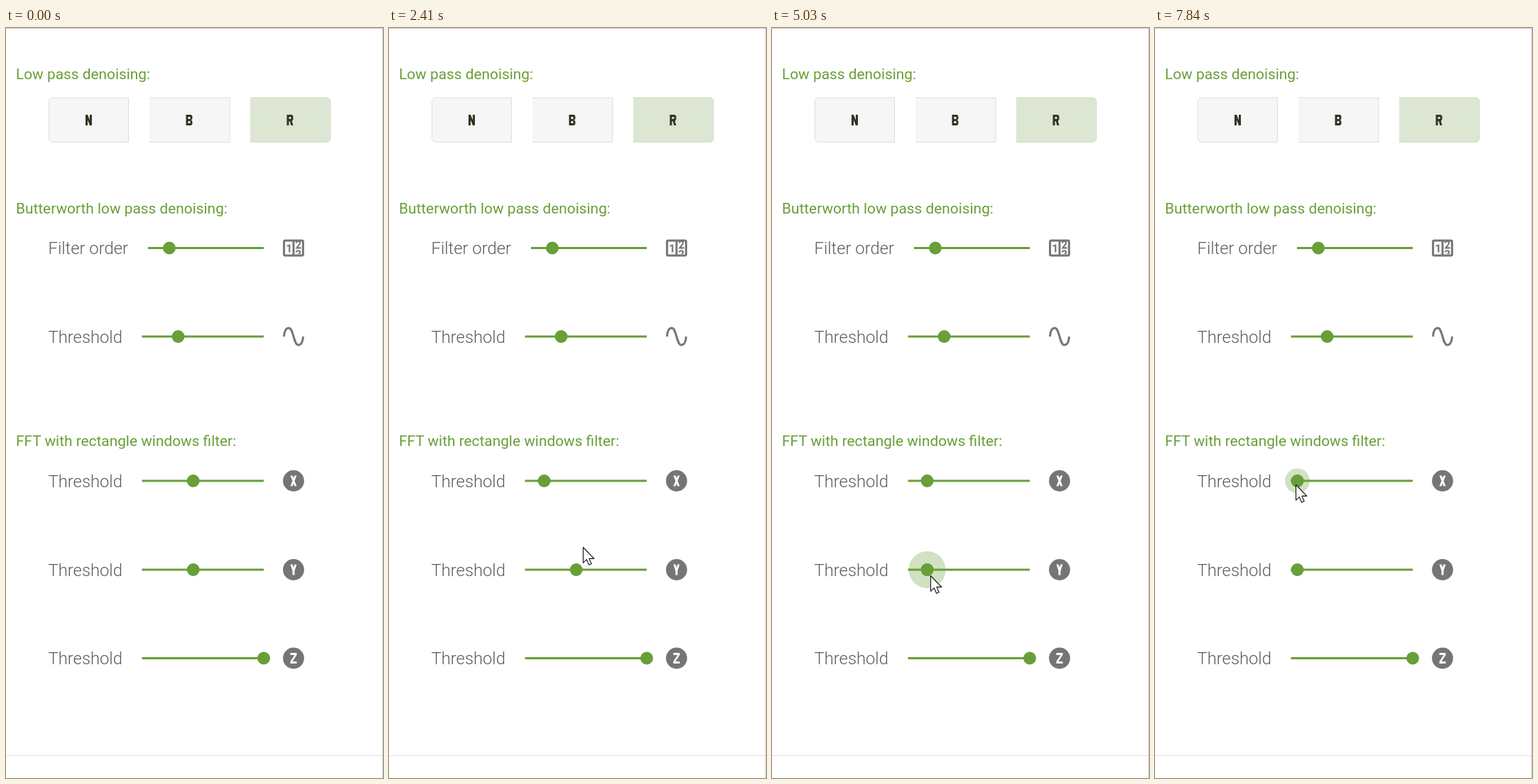
An HTML page that plays this animation: 531 by 1055 pixels, repeating every 8000 ms.

```html
<!DOCTYPE html>
<html lang="en">
<head>
<meta charset="utf-8">
<title>Denoising settings</title>
<style>
  html, body { margin: 0; width: 100%; height: 100%; overflow: hidden; background: #fff; }
  svg { display: block; width: 531px; height: 1055px; font-family: Roboto, sans-serif; }
  .head { font-size: 20.85px; fill: #689f38; }
  .label { font-size: 23.8px; font-weight: 300; fill: #5c5c5c; }
  .line { stroke: #689f38; stroke-width: 3; }
  .green { fill: #689f38; }
  .halo { fill: #689f38; fill-opacity: .3; }
  .num { font-size: 17.9px; fill: #fff; text-anchor: middle; }
  .icon { fill: #757575; }
  .stroke { fill: none; stroke: #757575; }
  .letter { fill: #2f3424; }
</style>
</head>
<body>
<svg id="stage" viewBox="0 0 531 1055">
  <path d="M0 .5H530.5V1055" fill="none" stroke="#c9c9c9"/>
  <path d="M0 1023.5H530" stroke="#e0e0e0"/>

  <g class="head">
    <text x="14" y="72">Low pass denoising:</text>
    <text x="14" y="260.5">Butterworth low pass denoising:</text>
    <text x="14" y="588">FFT with rectangle windows filter:</text>
  </g>

  <g stroke="#dedede">
    <path fill="#f6f6f6" d="M172.5 98H66a5.5 5.5 0 0 0-5.5 5.5V155a5.5 5.5 0 0 0 5.5 5.5H172.5Z"/>
    <path fill="#f6f6f6" d="M202 98H315V160.5H202"/>
    <path fill="#dde6d3" stroke="#d3dac9" d="M344 98H451.500a5.500 5.500 0 0 1 5.500 5.500V155a5.500 5.500 0 0 1-5.500 5.500H344"/>
  </g>
  <g class="letter" id="letters"></g>

  <g id="rows"></g>
  <g id="icons"></g>

  <g id="active">
    <circle class="halo" id="halo"/>
    <circle class="green" id="grip" r="9"/>
    <g id="pin">
      <path class="green" d="M0 -17L-16.400 -33.400A23.200 23.200 0 1 1 16.400 -33.400Z"/>
      <text class="num" id="num" y="-43.500"></text>
    </g>
  </g>
  <g id="cursor">
    <circle id="press" r="17.500" fill="#ff0" fill-opacity=".5"/>
    <path d="M.5 .5V22.300L5.300 17.700L8.700 25.300L12.200 23.800L8.900 16.400H15.800Z"
          fill="#fff" stroke="#111" stroke-width="1.100" stroke-linejoin="round"/>
  </g>
</svg>
<script>
const $ = id => document.getElementById(id);
const LOOP = 8000;
const ROW = { x: 637, y: 762 };
const HALO = 39;
const valueX = v => 191.5 + (v - 1) * 9.026;

// 24-unit icon shapes
const glyph = {
  N: 'M9 7H11L13 12V7H15V17H13L11 12V17H9Z',
  B: 'M15 10.5C15 11.3 14.3 12 13.5 12C14.3 12 15 12.7 15 13.5V15A2 2 0 0 1 13 17H9V7H13A2 2 0 0 1 15 9ZM13 15V13H11V15ZM13 11V9H11V11Z',
  R: 'M9 7H13A2 2 0 0 1 15 9V11C15 11.8 14.5 12.5 13.8 12.8L15 17H13L11.8 13H11V17H9ZM11 9V11H13V9Z',
  X: 'M9 7L11 12L9 17H11L12 14.5L13 17H15L13 12L15 7H13L12 9.5L11 7Z',
  Y: 'M11 17H13V13L15 7H13L12 10L11 7H9L11 13Z',
  Z: 'M9 7V9H13L9 15V17H15V15H11L15 9V7Z'
};
const icon = (x, y, body) =>
  `<g transform="translate(${x} ${y}) scale(1.489) translate(-12 -12)">${body}</g>`;
const letter = (x, y, name) =>
  icon(x, y, `<path fill-rule="evenodd" d="${glyph[name]}"/>`);
const badge = (y, name) => icon(405, y,
  `<circle class="icon" cx="12" cy="12" r="10"/><path fill="#fff" d="${glyph[name]}"/>`);
const row = (y, text, x0, knob, id = '') =>
  `<text class="label" x="59.5" y="${y + 8.5}">${text}</text>` +
  `<path class="line" d="M${x0} ${y}H363"/>` +
  `<circle class="green" ${id && `id="${id}"`} cx="${knob}" cy="${y}" r="9"/>`;

$('letters').innerHTML = letter(116.5, 129.5, 'N') + letter(258, 129.5, 'B') + letter(400, 129.5, 'R');
$('rows').innerHTML =
  row(309.5, 'Filter order', 200, 230) +
  row(434, 'Threshold', 191.5, 242.5) +
  row(ROW.x, 'Threshold', 191.5, 264, 'knobX') +
  row(ROW.y, 'Threshold', 191.5, 264, 'knobY') +
  row(886.5, 'Threshold', 191.5, 363);
$('icons').innerHTML =
  icon(405, 309.5, `<g class="stroke"><rect x="3" y="5" width="18" height="14" rx="1" stroke-width="2"/>
    <path stroke-width="2" d="M12 5V19"/>
    <path stroke-width="1.4" d="M14.65 7.3C14.7 5 18.2 5 18.15 7.3C18.1 8.5 16 10.100 15 11.9H19.2M14.7 16C14.7 14 18.2 14 18.2 16C18.2 17 17.3 17 16.8 17.6"/></g>
    <path class="icon" d="M8.92 16H7.42V10.2L5.62 10.76V9.53L8.76 8.41H8.92Z"/>`) +
  icon(405, 434, '<path class="stroke" stroke-width="2" d="M3 12C3 12 3 4 7.5 4C12 4 12 20 16.5 20C21 20 21 12 21 12"/>') +
  badge(ROW.x, 'X') + badge(ROW.y, 'Y') + badge(886.5, 'Z');

// time, pointer x, pointer y, slider, value, halo radius (HALO = dragging)
const steps = [
  [200, 351, 721], [400, 315, 690], [600, 272, 655],
  [800, 257, 651, 'x', 9, 22], [1000, 257, 651, 'x', 9, HALO],
  [1200, 248, 651, 'x', 8, HALO], [1400, 239, 651, 'x', 7, HALO],
  [1600, 225, 651, 'x', 5, HALO], [1800, 212, 651, 'x', 4, HALO],
  [2010, 214, 653, 'x', 4, 26], [2210, 242, 690], [2410, 273, 730],
  [2600, 272, 768, 'y', 9, 22], [2800, 264, 771, 'y', 8, HALO],
  [3010, 246, 771, 'y', 6, HALO], [3210, 228, 771, 'y', 4, HALO],
  [3410, 218, 771, 'y', 3, HALO], [3810, 221, 771, 'y', 4, HALO],
  [4010, 222, 771, 'y', 4, HALO], [4830, 223, 770, 'y', 4, HALO],
  [5030, 223, 770, 'y', 4, 26], [5230, 223, 770, 'y', 4, HALO],
  [5430, 216, 770, 'y', 3, HALO], [5630, 208, 770, 'y', 2, HALO],
  [5830, 210, 762, 'y', 2, 26], [6030, 228, 673],
  [6230, 226, 640, 'x', 4, 22], [6430, 226, 639, 'x', 4, HALO],
  [6830, 222, 638, 'x', 4, HALO], [7030, 217, 638, 'x', 3, HALO],
  [7230, 209, 639, 'x', 2, HALO], [7440, 203, 641, 'x', 2, HALO],
  [7640, 199, 642, 'x', 2, HALO], [7840, 198, 642, 'x', 2, 17.5]
];

const show = (el, on) => el.setAttribute('display', on ? 'inline' : 'none');
const move = (el, x, y) => el.setAttribute('transform', `translate(${x} ${y})`);

function draw(t) {
  const value = { x: 9, y: 9 };
  let now = null;
  for (const s of steps) {
    if (s[0] > t) break;
    now = s;
    if (s[3]) value[s[3]] = s[4];
  }
  $('knobX').setAttribute('cx', valueX(value.x));
  $('knobY').setAttribute('cx', valueX(value.y));
  show($('cursor'), now);
  show($('active'), now && now[3]);
  if (!now) return;

  const [, x, y, slider, v, r] = now;
  const drag = r === HALO;
  move($('cursor'), x, y);
  show($('press'), drag);
  if (!slider) return;
  move($('active'), valueX(v), ROW[slider]);
  $('halo').setAttribute('r', r);
  show($('pin'), drag);
  $('num').textContent = v;
}

const start = performance.now();
function tick() {
  draw((performance.now() - start) % LOOP);
  requestAnimationFrame(tick);
}
tick();
</script>
</body>
</html>
```
